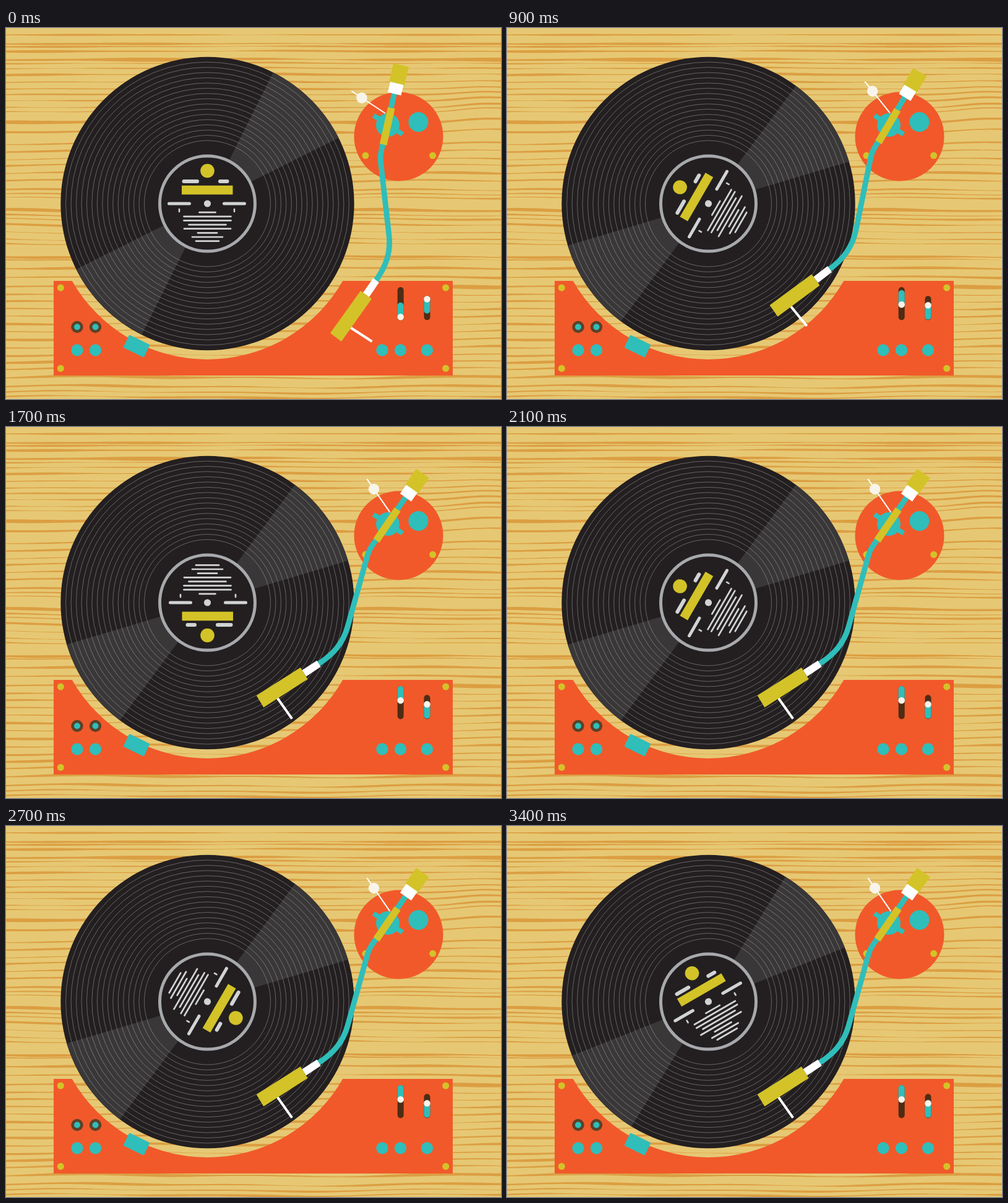
These frames come from a looping animation (800x600 px, 3500 ms). An HTML page:

```html
<!DOCTYPE html>
<html lang="en">
<head>
<meta charset="utf-8">
<title>Turntable</title>
<style>
  html, body { margin: 0; width: 100%; height: 100%; overflow: hidden; background: #e6c874; }
  svg { display: block; width: 800px; height: 600px; }
  .teal { fill: #2fbeba; }
  .gold { fill: #d3c328; }
  .orange { fill: #f1592a; }
  .white { fill: #fff; }
  .cream { fill: #f9f4ea; }
  .ink { fill: #231f20; }
  .slot { fill: #4d2c14; }
  .line { fill: none; stroke-linecap: round; stroke: #d1d3d4; }
</style>
</head>
<body>
<svg viewBox="0 0 800 600">
  <g id="wood" fill="#dc9e42"></g>

  <path class="orange" d="M77 409H106.7A252 252 0 0 0 544.3 409H722V562H77Z"/>
  <g id="deck"></g>
  <rect class="teal" x="-18.5" y="-11.5" width="37" height="23" rx="2" transform="translate(211 514.5) rotate(26)"/>

  <g transform="translate(325.5 284)">
    <circle class="ink" r="237.2"/>
    <g id="sheen" fill="#393738"></g>
    <g id="grooves" fill="none" stroke="#fff" stroke-opacity=".3"></g>
    <circle class="ink" r="77" stroke="#a7a9ac" stroke-width="5"/>
    <g id="label">
      <circle class="gold" cy="-53" r="11.3"/>
      <rect class="gold" x="-41.5" y="-29.2" width="82.5" height="14.5"/>
      <path class="line" stroke-width="6" d="M-38 -36H-16.5M20.5 -36H32"/>
      <path class="line" stroke-width="5" d="M-62 0H-29M27 0H60"/>
      <path class="line" stroke-width="2.6" stroke-linecap="butt" d="M-45.5 9V13M43.5 9V13"/>
      <g id="text"></g>
      <circle r="5.6" fill="#d1d3d4"/>
    </g>
  </g>

  <g id="base"></g>
  <path d="M594 141.5L641 172" stroke="#2fbeba" stroke-width="8"/>
  <circle class="teal" cx="617" cy="157" r="19"/>
  <g id="arm">
    <path d="M558.5 102L613 138" stroke="#fff" stroke-width="2"/>
    <circle class="cream" cx="575" cy="113" r="8.7"/>
    <path fill="none" stroke="#2fbeba" stroke-width="8.8"
      d="M628 104L606.5 199Q604.5 207 605.5 216L619 335C622 362 615 385 596 411"/>
    <path class="gold" d="M626 57L651 63L643.5 94L619 88Z"/>
    <path class="white" d="M621 87L642.500 92L638.500 109L617 104Z"/>
    <path class="gold" d="M617 128L628.500 130.500L615.500 190L604 187Z"/>
    <path class="white" d="M593.500 404.500L603 411.500L587 435L577 428Z"/>
    <path d="M556 484L591.500 507" stroke="#fff" stroke-width="4"/>
    <path class="gold" d="M573 425L591 438L542 507L524 493.500Z"/>
  </g>
</svg>
<script>
const NS = 'http://www.w3.org/2000/svg';
const $ = id => document.getElementById(id);

function add(parent, tag, attrs) {
  const el = document.createElementNS(NS, tag);
  for (const k in attrs) el.setAttribute(k, attrs[k]);
  return parent.appendChild(el);
}
const dot = (parent, cls, cx, cy, r) => add(parent, 'circle', { class: cls, cx, cy, r });
const pill = (parent, cls, x, y, h) =>
  add(parent, 'rect', { class: cls, x: x - 5, y, width: 10, height: h, rx: 5 });

// Wood grain: height and thickness of each streak
const streaks = [
  [11, 3], [25.5, 4], [30, 3], [37.5, 4], [51, 6], [57, 2.5], [65, 3], [75, 4],
  [87, 3.5], [98, 4], [107, 3], [117, 4], [128, 3.5], [135, 3], [152, 5.5],
  [168, 6], [188, 3], [200, 3], [213, 3], [223, 3.5], [236, 4], [248, 3],
  [263, 3], [270, 2], [276, 3], [296, 5], [304, 2.5], [310, 3], [319, 4],
  [331, 2.5], [342, 3], [349, 3], [370, 4], [374, 2], [388, 4], [402, 4],
  [417, 6], [430, 3], [441, 3], [453, 4], [465, 3], [478, 4], [490, 3],
  [503, 4], [516, 4], [529, 3], [540, 4], [551, 3], [565, 5], [580, 4],
  [589, 3], [597, 4]
];

function warp(x, y) {
  const k = Math.min(1, y / 130);
  const swell = Math.exp(-(((x - 770) / 60) ** 2) - ((y - 125) / 45) ** 2);
  return k * (1.6 * Math.sin(x / 105 + y / 60) + Math.sin(x / 46 + y / 27)) - 6 * swell;
}

for (const [y, h] of streaks) {
  const top = [], bottom = [];
  for (let x = 0; x <= 800; x += 8) {
    const mid = y + warp(x, y);
    const half = h * (0.32 + 0.17 * Math.sin(x / 85 + y * 1.7) + 0.07 * Math.sin(x / 31 + y));
    top.push(`${x} ${(mid - half).toFixed(2)}`);
    bottom.unshift(`${x} ${(mid + half).toFixed(2)}`);
  }
  add($('wood'), 'path', { d: `M${top.concat(bottom).join('L')}Z` });
}

// Deck fittings
const deck = $('deck');
for (const x of [88.3, 710.7]) for (const y of [420, 550.5]) dot(deck, 'gold', x, y, 5.5);
for (const x of [115, 144.5]) {
  dot(deck, '', x, 483.5, 9.7).setAttribute('fill', '#5c4128');
  dot(deck, 'teal', x, 483.5, 5);
}
for (const x of [115, 144.5, 608, 637.5, 680.5]) dot(deck, 'teal', x, 521, 9.7);

function slider(x, top, knobY, fillY) {
  pill(deck, 'slot', x, top, 472.5 - top);
  const g = add(deck, 'g', {});
  pill(g, 'teal', x, fillY, 28.5);
  dot(g, 'cream', x, knobY, 5.2);
  return g;
}
const leftSlider = slider(637.7, 419, 467.2, 444);
const rightSlider = slider(680.5, 433.3, 438.5, 433.3);

// Record
const polar = (deg, r) => {
  const a = deg * Math.PI / 180;
  return `${r * Math.sin(a)} ${-r * Math.cos(a)}`;
};
for (const mid of [45, 225]) {
  add($('sheen'), 'path', {
    d: `M0 0L${polar(mid - 18.4, 237.2)}A237.2 237.2 0 0 1 ${polar(mid + 18.4, 237.2)}Z`
  });
}
for (let i = 0; i < 16; i++) add($('grooves'), 'circle', { r: 102 + i * 8.46 });

const textLines = [[-13, 13], [-38, 38], [-38, 38], [-30, 30], [-37.5, 37.5], [-15.5, 15.5], [-24.5, 24.5], [-18.5, 18.5]];
textLines.forEach(([a, b], i) => add($('text'), 'path', {
  class: 'line', 'stroke-width': 2.7, d: `M${a} ${14.2 + i * 6.63}H${b}`
}));

// Arm base
const base = $('base');
dot(base, 'orange', 634.5, 175.5, 72);
dot(base, 'teal', 666.5, 152, 16);
for (const x of [581, 689.7]) dot(base, 'gold', x, 206.3, 5.5);

const turn = (el, deg, centre = '') => el.setAttribute('transform', `rotate(${deg} ${centre})`);
const slide = (el, y) => el.setAttribute('transform', `translate(0 ${y})`);

function pose(tick) {
  // The record skips one beat as the needle lands
  const landed = tick >= 7;
  const beat = landed ? tick + 1 : tick;
  turn($('label'), beat * 30);
  turn($('sheen'), beat % 2 ? 5 : landed ? 10 : 0);
  turn($('arm'), Math.min(22, tick * 2), '617 157');
  slide(leftSlider, -Math.min(25, beat * 2));
  slide(rightSlider, Math.min(10, tick * 2));
}

const start = performance.now();
function draw(now) {
  pose(Math.floor(Math.max(0, now - start) / 100) % 35);
  requestAnimationFrame(draw);
}
pose(0);
requestAnimationFrame(draw);
</script>
</body>
</html>
```
